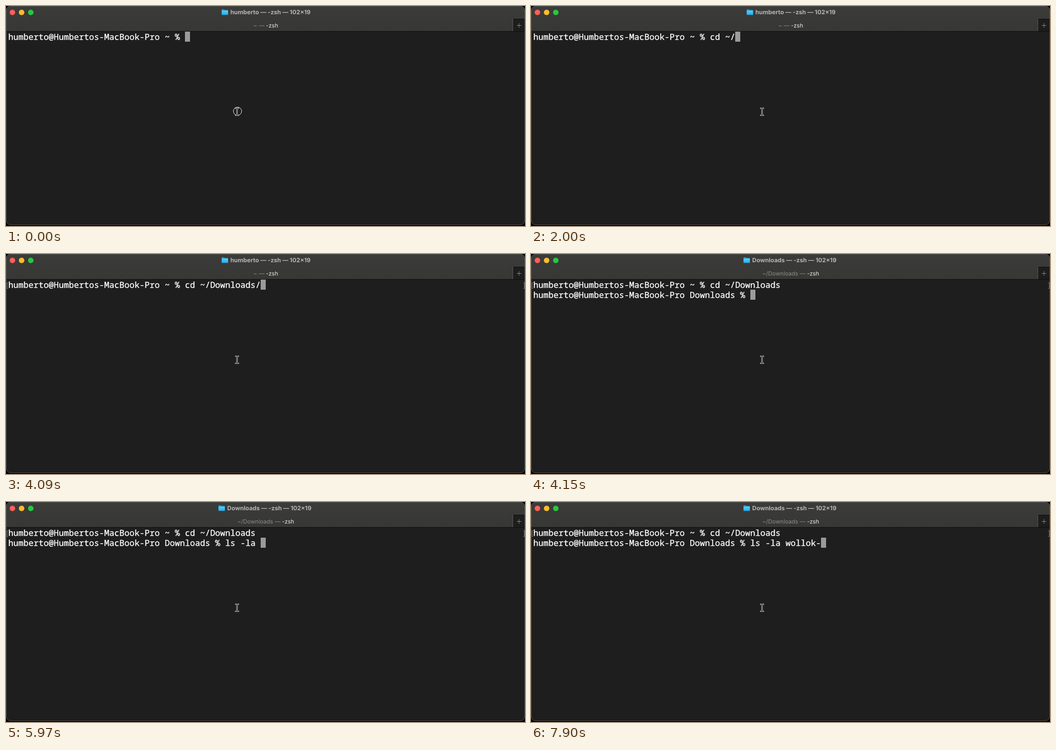
Recreate the animation shown at these times as an HTML page. Size 1131x481 px, loop 7990 ms.

```html
<!DOCTYPE html>
<html lang="en">
<head>
<meta charset="utf-8">
<title>Terminal</title>
<style>
  html, body { margin: 0; width: 100%; height: 100%; overflow: hidden; background: #000; }
  svg { display: block; width: 100%; height: 100%; }
  text { white-space: pre; text-rendering: geometricPrecision; }
  .mono { font: 500 18.333px "Noto Sans Mono", "DejaVu Sans Mono", monospace; fill: #fff; stroke: #fff; stroke-width: .35px; }
  .title { font: 700 13px Inter, "Open Sans", sans-serif; fill: #b4b4b2; }
  .tab { font: 400 12.4px Inter, "Open Sans", sans-serif; fill: #8c8c8a; text-anchor: middle; }
  .tab .on { fill: #ececea; }
  .line { fill: none; stroke-width: 1; }
  .beam { fill: none; stroke-linecap: round; }
  #halo { animation: halo 7990ms step-end infinite; }
  @keyframes halo { 0% { opacity: 1; } 0.6% { opacity: 0; } }
</style>
</head>
<body>
<svg viewBox="0 0 1131 481">
  <defs>
    <linearGradient id="bar" x1="0" y1="0" x2="0" y2="1">
      <stop offset="0" stop-color="#3b3b39"/>
      <stop offset="1" stop-color="#373735"/>
    </linearGradient>
    <linearGradient id="blue" x1="0" y1="0" x2="0" y2="1">
      <stop offset="0" stop-color="#5ccdf8"/>
      <stop offset="1" stop-color="#27a9e5"/>
    </linearGradient>
    <clipPath id="frame"><rect width="1131" height="479" rx="10"/></clipPath>
    <path id="beam" d="M500.5 223.5Q503.5 223.5 503.5 226V236.5Q503.5 239 500.5 239M506.5 223.5Q503.5 223.5 503.5 226M503.5 236.5Q503.5 239 506.5 239"/>
  </defs>

  <g clip-path="url(#frame)">
    <rect width="1131" height="479" fill="#1e1e1e"/>
    <rect width="1131" height="56" fill="url(#bar)"/>
    <rect x="1105" y="28" width="26" height="28" fill="#1d1d1c"/>
    <path class="line" d="M1104.5 28V56" stroke="#5a5a58"/>
    <path class="line" d="M1105 28.5H1131M0 55.5H1131" stroke="#0c0c0c"/>
    <path class="line" d="M1113 42.5H1123M1118 37.5V47.5" stroke="#8e8e8c"/>
  </g>
  <rect class="line" x=".5" y=".5" width="1130" height="478" rx="9.5" stroke="#565656"/>

  <circle cx="14" cy="14" r="6" fill="#ff5f57"/>
  <circle cx="34" cy="14" r="6" fill="#febc2e"/>
  <circle cx="54" cy="14" r="6" fill="#28c840"/>

  <g id="folder">
    <path d="M0 1.5Q0 0 1.5 0H4.8L6.3 1.5H12.5Q14 1.5 14 3V11H0Z" fill="#1e93cf"/>
    <rect y="3" width="14" height="9.5" rx="1.2" fill="url(#blue)"/>
  </g>
  <text id="title" class="title" y="18"></text>
  <text class="tab" x="566" y="47"><tspan id="path"></tspan> — <tspan class="on">-zsh</tspan></text>

  <path id="marks" class="line" d="M4.5 62.5H2.5V75.5H4.5M1127.5 62.5H1129.5V75.5H1127.5" stroke="#8a8a8a"/>
  <rect id="cursor" width="11" height="22" fill="#9c9b9b"/>
  <text id="row0" class="mono" x="5" y="74"></text>
  <text id="row1" class="mono" x="5" y="96"></text>

  <circle id="halo" class="line" cx="504.5" cy="230" r="9" stroke="#fff"/>
  <use class="beam" href="#beam" stroke="#fff" stroke-width="2.6"/>
  <use class="beam" href="#beam" stroke="#111" stroke-width="1.1"/>
</svg>

<script>
const LOOP = 7990, CELL = 11;
const LEAD = 20; // draw for the moment the picture reaches the screen
const USER = "humberto", HOST = "humberto@Humbertos-MacBook-Pro";
const $ = id => document.getElementById(id);

// Each key time reveals one more character.
const CD = "cd ~/Downl";
const CD_KEYS = [690, 960, 1110, 1490, 2000, 2480, 2590, 2690, 2800, 2980];
const LS = "ls -la wollok-";
const LS_KEYS = [5110, 5190, 5270, 5350, 5470, 5520, 5970, 7230, 7260, 7490, 7590, 7690, 7800, 7900];
const COMPLETE = 3190, MARKS = 3220, ENTER = 4090, PROMPT = 4120, RETITLE = 4150;

const typed = (text, keys, t) => text.slice(0, keys.filter(k => t >= k).length);

function command(t) {
  if (t < COMPLETE) return typed(CD, CD_KEYS, t);
  return t < ENTER ? "cd ~/Downloads/" : "cd ~/Downloads";
}

function draw(t) {
  const first = `${HOST} ~ % ${command(t)}`;
  const second = t < PROMPT ? "" : `${HOST} Downloads % ${typed(LS, LS_KEYS, t)}`;
  const row = t < ENTER ? 0 : 1;
  const moved = t >= RETITLE;

  $("row0").textContent = first;
  $("row1").textContent = second;
  $("cursor").setAttribute("x", 5 + CELL * (row ? second : first).length);
  $("cursor").setAttribute("y", 56 + 22 * row);
  $("marks").style.opacity = t < MARKS ? 0 : 1;

  $("folder").setAttribute("transform", `translate(${moved ? 463 : 470} 7)`);
  $("title").setAttribute("x", moved ? 482 : 489);
  $("title").textContent = `${moved ? "Downloads" : USER} — -zsh — 102×19`;
  $("path").textContent = moved ? "~/Downloads" : "~";
}

const clock = $("halo").getAnimations()[0];

function tick() {
  const now = clock?.currentTime ?? performance.now();
  draw((now + LEAD) % LOOP);
  requestAnimationFrame(tick);
}
draw(0);
requestAnimationFrame(tick);
</script>
</body>
</html>
```
